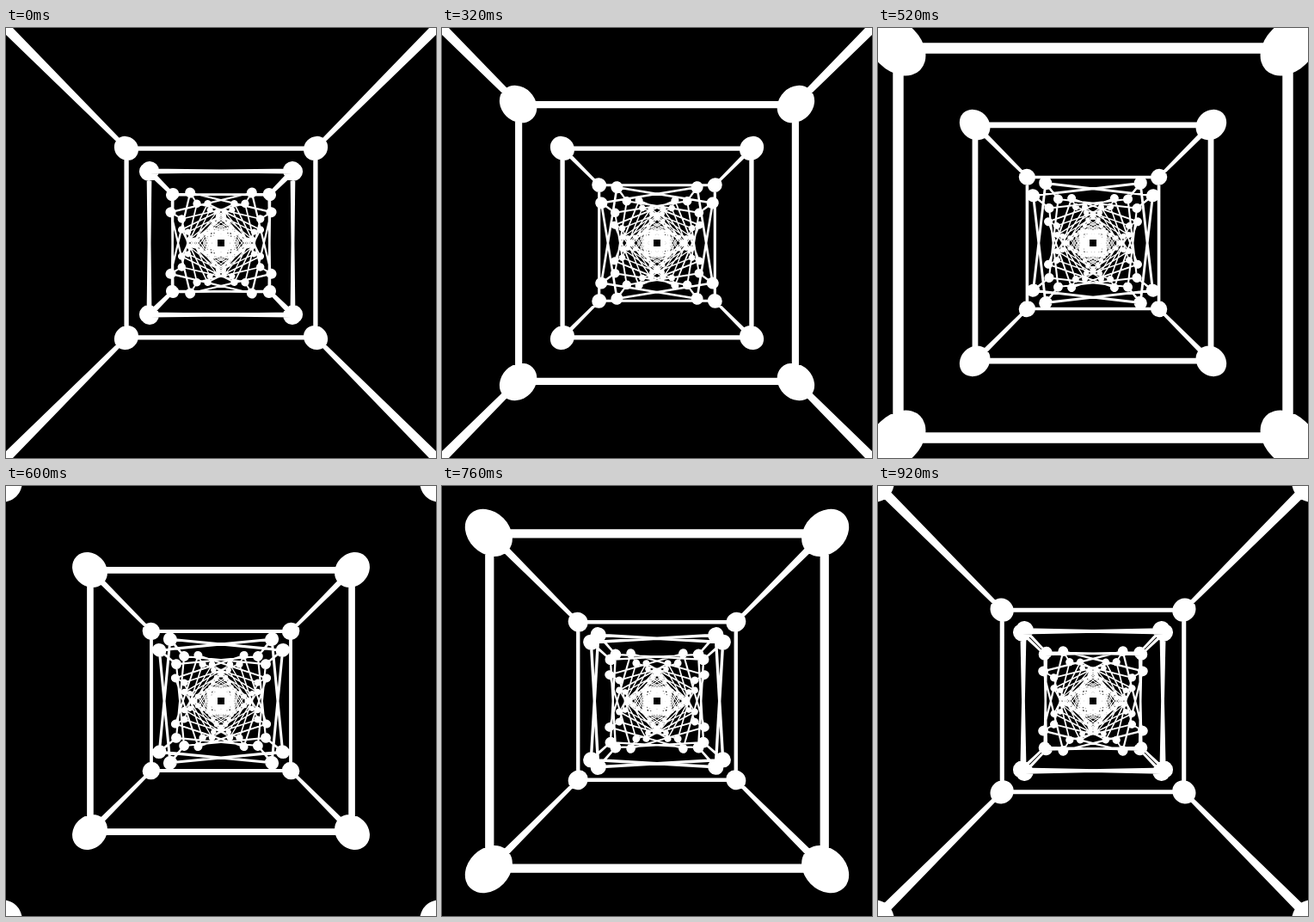
An HTML page for the animation above (960 ms loop, 500 by 500 pixels).

```html
<!DOCTYPE html>
<html lang="en">
<head>
<meta charset="utf-8">
<title>Cube tunnel</title>
<style>
  html, body { margin: 0; width: 100%; height: 100%; overflow: hidden; background: #000; }
  svg { display: block; width: 100vw; height: 100vh; }
</style>
</head>
<body>
<svg viewBox="0 0 500 500">
  <rect width="500" height="500" fill="#000"/>
  <path id="tunnel" fill="#fff"/>
  <rect x="246" y="246" width="8" height="8" fill="#000"/>
</svg>
<script>
const LOOP = 960, STEP = 40;
const FOCAL = 347, MID = 250;
// Lengths in units of half a cube edge
const CUBES = 30, PITCH = 3, DEPTH = 2, FIRST = 1.157, NEAR = 0.5;
const BALL = 0.123, ROD = 0.023;
const TWIST = 12.86 * Math.PI / 180, STRAIGHT = 0.948;
const tunnel = document.getElementById('tunnel');
const num = v => v.toFixed(2);
const point = (x, y) => num(x) + ' ' + num(y);

// Bar from a to b with its own half width at each end
function bar(a, b, wa, wb) {
  const dx = b.x - a.x, dy = b.y - a.y, len = Math.hypot(dx, dy) || 1;
  const nx = -dy / len, ny = dx / len;
  return 'M' + point(a.x + nx * wa, a.y + ny * wa) +
    'L' + point(b.x + nx * wb, b.y + ny * wb) +
    'L' + point(b.x - nx * wb, b.y - ny * wb) +
    'L' + point(a.x - nx * wa, a.y - ny * wa) + 'Z';
}

// Perspective outline of a sphere: an ellipse stretched away from the centre
function ball(angle, z) {
  const rho = Math.SQRT2, k = z * z - BALL * BALL;
  const dist = FOCAL * rho * z / k;
  const across = FOCAL * BALL / Math.sqrt(k);
  const along = FOCAL * BALL * Math.sqrt(k + rho * rho) / k;
  const c = Math.cos(angle), s = Math.sin(angle);
  const x = MID + dist * c, y = MID + dist * s;
  const arc = `A${num(along)} ${num(across)} ${num(angle * 180 / Math.PI)} 0 0 `;
  return 'M' + point(x + along * c, y + along * s) +
    arc + point(x - along * c, y - along * s) +
    arc + point(x + along * c, y + along * s) + 'Z';
}

function corners(z, turn) {
  const dist = FOCAL / z * Math.SQRT2;
  return [1, 3, 5, 7].map(n => {
    const angle = n * Math.PI / 4 + turn;
    return { angle, x: MID + dist * Math.cos(angle), y: MID + dist * Math.sin(angle) };
  });
}

const rodWidth = z => Math.max(0.5, FOCAL * ROD / z);

function face(pts, z) {
  const w = rodWidth(z) * Math.sqrt(1 + 1 / (z * z));
  return pts.map((p, i) => bar(p, pts[(i + 1) % 4], w, w) + ball(p.angle, z)).join('');
}

function cube(z, turn) {
  const back = z + DEPTH;
  if (back <= NEAR) return '';
  const front = Math.max(z, NEAR);
  const a = corners(front, turn), b = corners(back, turn);
  let d = face(b, back);
  if (z > NEAR) d += face(a, z);
  a.forEach((p, i) => { d += bar(p, b[i], rodWidth(front), rodWidth(back)); });
  return d;
}

function draw(ms) {
  const t = Math.floor(ms % LOOP / STEP) * STEP / LOOP;
  let d = '';
  for (let k = 0; k < CUBES; k++) {
    const z = FIRST + PITCH * (k - t);
    const turn = TWIST * Math.max(0, k - STRAIGHT - t);
    d += cube(z, turn);
    if (turn) d += cube(z, -turn);
  }
  tunnel.setAttribute('d', d);
}

const start = performance.now();
function tick() {
  draw(performance.now() - start);
  requestAnimationFrame(tick);
}
tick();
</script>
</body>
</html>
```
